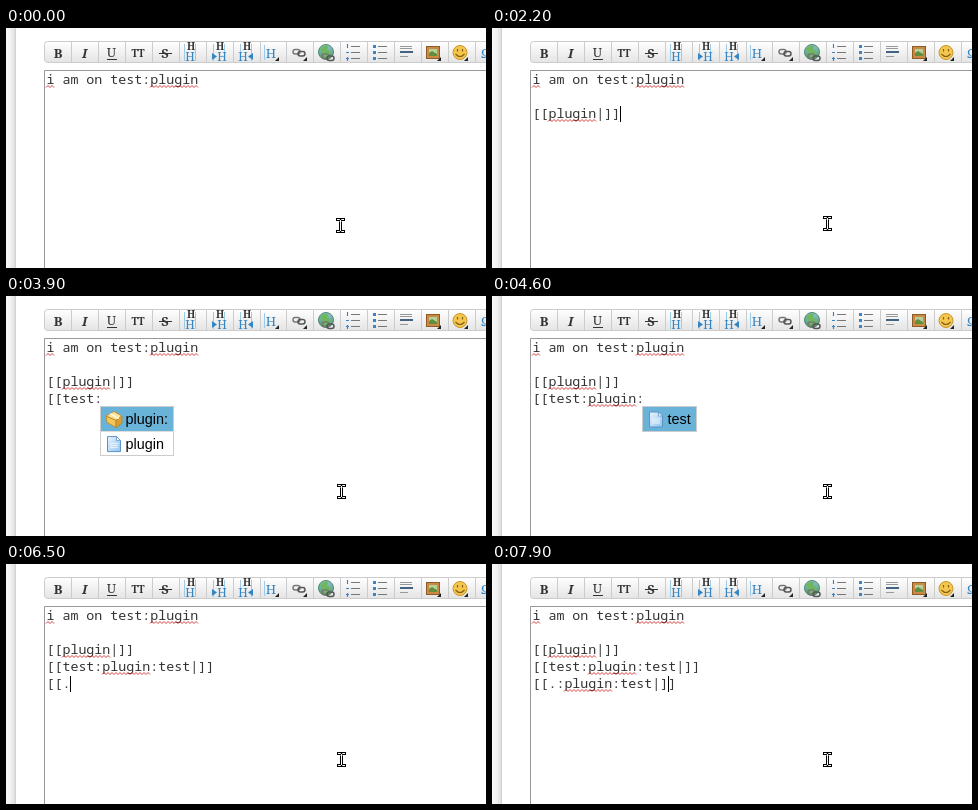
Write an HTML page that moves like this. It is 480 px wide and 240 px high and loops after 8 s.

```html
<!DOCTYPE html>
<html lang="en">
<head>
<meta charset="utf-8">
<title>Link completion in a wiki editor</title>
<style>
  html, body { margin: 0; width: 480px; height: 240px; overflow: hidden; background: #fff; }
  svg { display: block; }
  text { white-space: pre; }
  .mono { font: 13.33px "Noto Sans Mono", "DejaVu Sans Mono", monospace; fill: #333; }
  .item { font: 14.4px "Liberation Sans", Arial, sans-serif; fill: #000; }
  .tool { font: 13px "Noto Serif", "Liberation Serif", serif; fill: #333; text-anchor: middle; }
  .bold { font-weight: bold; }
  .small { font-size: 10px; }
  .blue { fill: #3485c4; }
</style>
</head>
<body>
<svg width="480" height="240" viewBox="0 0 480 240">
  <defs>
    <linearGradient id="edge"><stop stop-color="#f8f8f8"/><stop offset=".5" stop-color="#f2f2f2"/><stop offset="1" stop-color="#dedede"/></linearGradient>
    <linearGradient id="bar" x2="0" y2="1"><stop stop-color="#fff"/><stop offset="1" stop-color="#e4e4e4"/></linearGradient>
    <linearGradient id="sheet" x2="1" y2="1"><stop stop-color="#eaf5ff"/><stop offset="1" stop-color="#8fc3ee"/></linearGradient>
    <linearGradient id="globe" x2="0" y2="1"><stop stop-color="#8fc0dc"/><stop offset="1" stop-color="#4f9a58"/></linearGradient>
    <g id="page">
      <path d="M.5.5h9l4 4v11h-13z" fill="url(#sheet)" stroke="#5d92c4"/>
      <path d="M9.5.5v4h4z" fill="#fff" stroke="#5d92c4" stroke-width=".8"/>
      <path d="M3 7.5h8M3 9.5h8M3 11.5h8" stroke="#fff" opacity=".7"/>
    </g>
    <g id="box" stroke="#b98522" stroke-width=".8" stroke-linejoin="round">
      <path d="M0 4.5 8 0l8 4.5-6 4.5z" fill="#fbe49a"/>
      <path d="M0 4.5 10 9v7L1 11z" fill="#f2c65a"/>
      <path d="M10 9l6-4.5v7L10 16z" fill="#d99e35"/>
      <path d="M4 2.2l9 4.8" stroke="#fff6d5" stroke-width="1.5"/>
    </g>
    <g id="chain" fill="none" stroke-width="1.5">
      <rect x="-6" y="-3" width="7" height="4.500" rx="2.200" stroke="#777"/>
      <rect x="-1" y="-1" width="7" height="4.500" rx="2.200" stroke="#555"/>
    </g>
    <path id="beam" d="M-3-6h2l1 1 1-1h2M-3 6h2l1-1 1 1h2M0-5v10" fill="none" stroke-linecap="square"/>
  </defs>

  <rect width="9" height="240" fill="url(#edge)"/>
  <path d="M9.5 0v240" stroke="#d2d2d2"/>

  <rect x="38.5" y="13.5" width="460" height="21" rx="3" fill="url(#bar)" stroke="#ccc"/>
  <path id="seps" stroke="#ccc"/>
  <g class="tool">
    <text class="bold" x="52" y="30">B</text>
    <text class="bold" x="78.5" y="30" font-style="italic">I</text>
    <text x="105.5" y="29">U</text>
    <text class="bold small" x="132" y="29">TT</text>
    <text class="bold" x="159" y="30">S</text>
    <path d="M101 31.5h10M153 25.5h13" stroke="#333"/>
  </g>
  <g id="heads"></g>

  <use href="#chain" x="293" y="24.5"/>

  <circle cx="320" cy="24" r="7.5" fill="url(#globe)" stroke="#4b8a6c"/>
  <path d="M314 21q4-5 8-3l-1 4 4 2-3 6-4-1-1-4z" fill="#6cb85a"/>
  <use href="#chain" x="322" y="29"/>

  <path d="M345 18.5h9M345 24.5h9M345 30.5h9M372 18.5h9M372 24.5h9M372 30.5h9" stroke="#777"/>
  <path d="M341.5 16v4M340 24.5h3M340 30.5h3M341.5 29v4" stroke="#3c83c4" stroke-width="1.2"/>
  <path d="M367 18.5h3M367 24.5h3M367 30.5h3" stroke="#3c83c4" stroke-width="3"/>

  <path d="M394 18.5h12M394 20.5h12M394 28.5h8" stroke="#999"/>
  <path d="M394 24h13" stroke="#43627f" stroke-width="2"/>

  <rect x="420.5" y="18.5" width="13" height="12" fill="#c98a45" stroke="#8e5a25"/>
  <rect x="423" y="21" width="8" height="7" fill="#b5cf9a"/>
  <path d="M423 28v-3l3-2 5 3v2z" fill="#5f8f3c"/>

  <circle cx="454" cy="24.5" r="7" fill="#f3c64c" stroke="#c9952c"/>
  <path d="M451.5 21v2.5M456.5 21v2.5M449.5 26q4.5 5 9 0" fill="none" stroke="#86601a" stroke-width="1.2"/>
  <path d="M273 29v4h-4zM301 29v4h-4zM435 29v4h-4zM462 29v4h-4z" fill="#222"/>
  <text class="tool blue" x="480" y="30">Ω</text>

  <path d="M500 42.5H38.5V245" fill="none" stroke="#999"/>
  <g id="doc"></g>
  <g id="mouse">
    <use href="#beam" stroke="#000" stroke-width="3"/>
    <use href="#beam" stroke="#fff"/>
  </g>
</svg>

<script>
const $ = id => document.getElementById(id);
const LOOP = 8000, LEFT = 40.4, CHAR = 8, LINE = 17, ROW = 24.6;

$('seps').setAttribute('d',
  Array.from({ length: 16 }, (_, i) => `M${Math.round(65 + i * 26.93) + .5} 14v20`).join(''));

// heading buttons: [centre, arrow direction]
$('heads').innerHTML = [[184, 0], [213, 1], [240, -1]].map(([x, dir]) => `
  <path d="M${x - 5.5} 16v17M${x + 5.5} 16v17" stroke="#9ccbe8"/>
  <text class="tool bold small" x="${x + 1}" y="22">H</text>
  <text class="tool blue" x="${x + 3 * dir}" y="33" style="font-size:12px">H</text>
  ${dir ? `<path d="M${x - dir * 7} 25l${dir * 5} 3.5l${-dir * 5} 3.5z" class="blue"/>` : ''}`).join('') + `
  <path d="M258.5 17v15" stroke="#9ccbe8"/>
  <text class="tool blue" x="265" y="30">H</text>`;

const menus = {
  root: { w: 69, items: ['plugin', ':test:', ':wiki:', ':start'] },
  test: { w: 73, items: ['plugin:', 'plugin'] },
  plugin: { w: 54, items: ['test'] }
};
const intro = 'i am on test:plugin\n\n';
const one = '[[plugin|]]\n', two = one + '[[test:plugin:test|]]\n';

// [start, text after the intro, caret shown, menu, selected row, caret steps back]
const steps = [
  [0, '', 0],
  [300, '', 1],
  [900, '[', 1],
  [1100, '[[', 1],
  [1200, '[[', 1, 'root', 0],
  [1900, '[[plugin|]]', 0],
  [2100, '[[plugin|]]', 1],
  [2300, one, 1],
  [2400, one + '[', 1],
  [2500, one + '[[', 1],
  [2600, one + '[[', 1, 'root', 0],
  [3100, one + '[[', 0, 'root', 0],
  [3400, one + '[[', 1, 'root', 1],
  [3700, one + '[[test:', 0],
  [3800, one + '[[test:', 0, 'test', 0],
  [4400, one + '[[test:plugin:', 0],
  [4600, one + '[[test:plugin:', 0, 'plugin', 0],
  [5000, one + '[[test:plugin:test|]]', 0],
  [5200, one + '[[test:plugin:test|]]', 1, '', 0, 1],
  [5400, one + '[[test:plugin:test|]]', 0],
  [5600, two, 1],
  [5800, two + '[', 1],
  [6000, two + '[[', 1],
  [6100, two + '[[', 1, 'root', 0],
  [6400, two + '[[.', 1],
  [6700, two + '[[.:', 1],
  [6800, two + '[[.:', 1, 'test', 0],
  [7100, two + '[[.:plugin:', 0],
  [7200, two + '[[.:plugin:', 0, 'plugin', 0],
  [7500, two + '[[.:plugin:test|]]', 0],
  [7700, two + '[[.:plugin:test|]]', 1, '', 0, 1]
];

const squiggle = (x, y, n) =>
  `<path d="M${x} ${y + 3.5}${'l2-2l2 2'.repeat(n * CHAR / 4)}" fill="none" stroke="#d42a2a" stroke-width=".9"/>`;

function drawLine(text, row) {
  const y = 56 + row * LINE;
  const marks = [...text.matchAll(/plugin|^i\b/g)]
    .map(m => squiggle(LEFT + m.index * CHAR - .4, y, m[0].length));
  return `<text class="mono" x="${LEFT}" y="${y}">${text}</text>` + marks.join('');
}

function drawMenu({ w, items }, selected, x, y) {
  const rows = items.map((label, i) => {
    const top = y + i * ROW;
    const icon = label.endsWith(':') ? 'box' : 'page';
    return (i === selected ? `<rect x="${x + .5}" y="${top + .5}" width="${w - 1}" height="${ROW - .6}" fill="#69b2d8"/>` : '') +
      (i ? `<path d="M${x} ${Math.round(top) + .5}h${w}" stroke="#ddd"/>` : '') +
      `<use href="#${icon}" x="${x + (icon === 'box' ? 5.5 : 6.5)}" y="${top + 5}"/>
       <text class="item" x="${x + 25}" y="${top + 17.5}">${label}</text>`;
  });
  return `<rect x="${x}" y="${y}" width="${w}" height="${Math.round(items.length * ROW)}" fill="#fff" stroke="#ccc"/>` + rows.join('');
}

function drawDoc([, text, , menu, selected, back = 0], caretOn) {
  const lines = (intro + text).split('\n');
  const row = lines.length - 1, col = lines[row].length;
  const base = 56 + row * LINE;
  const edge = n => Math.floor(LEFT + n * CHAR) + .5;
  let out = lines.map(drawLine).join('');
  if (caretOn) out += `<path d="M${edge(col - back)} ${base - 12}v16" stroke="#000"/>`;
  if (menu) out += drawMenu(menus[menu], selected, edge(col) - 2, base + 3.5);
  return out;
}

let shown = '';
function frame(now) {
  const t = now % LOOP;
  const step = steps.findLast(s => s[0] <= t);
  const caretOn = step[2] && (t - step[0]) % 1000 < 500;
  const key = step[0] + '/' + caretOn;
  if (key !== shown) {
    shown = key;
    $('doc').innerHTML = drawDoc(step, caretOn);
  }
  const k = Math.min(1, Math.max(0, (t - 200) / 400));
  $('mouse').setAttribute('transform', `translate(${334.5 + Math.round(k)} ${197.5 - Math.round(2 * k)})`);
  requestAnimationFrame(frame);
}
frame(performance.now());
</script>
</body>
</html>
```
